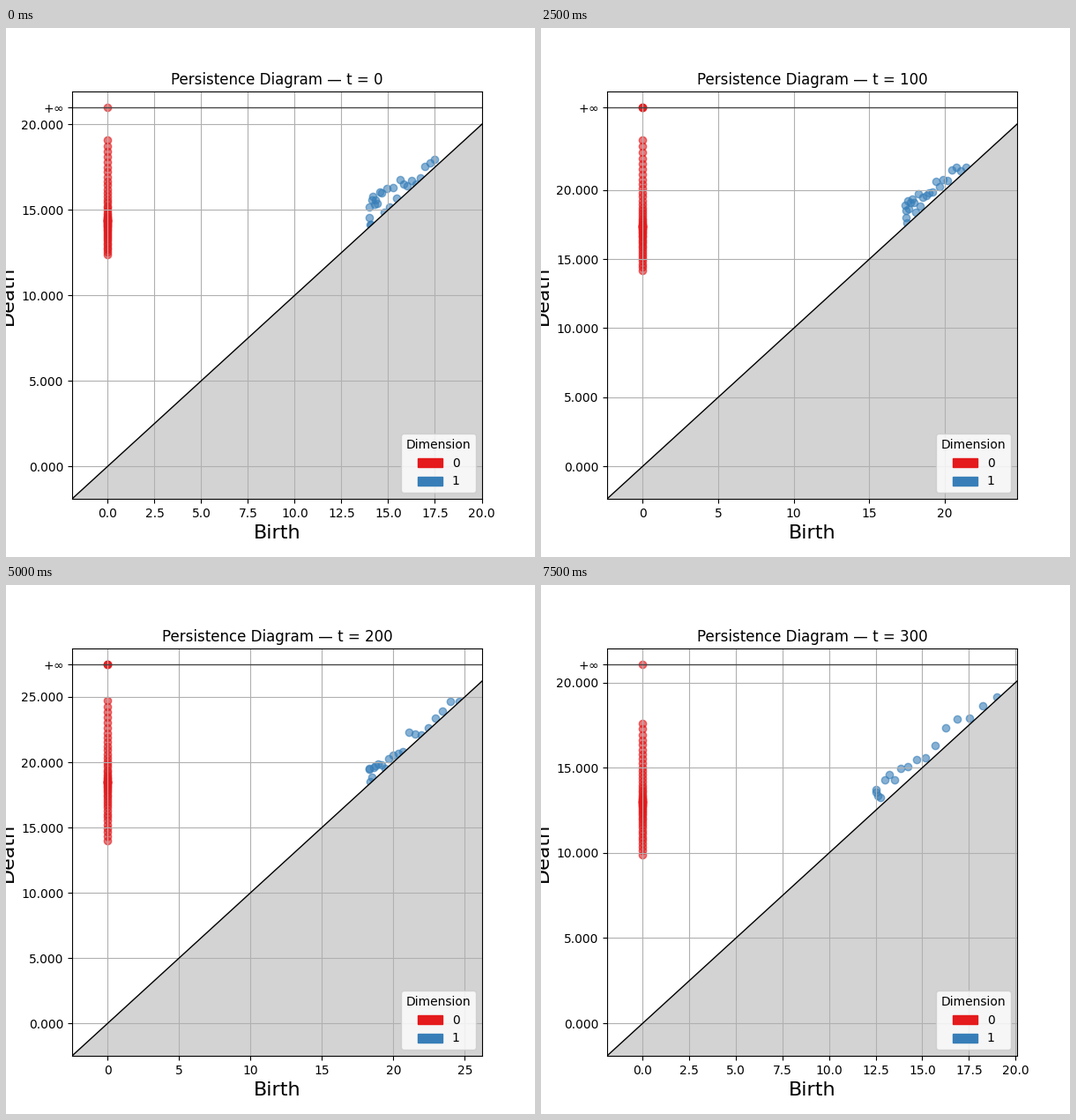
These frames come from a looping animation (600x600 px, 8000 ms). A matplotlib script:

```python
import numpy as np
import matplotlib.pyplot as plt
from matplotlib.animation import FuncAnimation
from matplotlib.patches import Patch, Polygon

RED, BLUE = plt.cm.Set1.colors[:2]
STEP, N_RED = 20, 50

# Largest death value at each step; it sets the axes
PEAKS = [19.07, 25.7, 25.7, 24.62, 24.4, 23.61, 23.7, 24.1,
         23.55, 24.95, 24.97, 24.4, 23.11, 22.2, 20.6, 19.13]

# Shape of the point clouds at key times, blended in between
TIMES = [0, 60, 100, 160, 200, 240, 300]
SHAPE = dict(
    low=[12.4, 14.5, 14.2, 12.5, 14.0, 11.0, 9.9],          # red deaths
    mid=[14.4, 18.1, 17.4, 17.9, 18.5, 14.0, 13.0],
    top=[1, 1, 1, 1, 0.99, 0.887, 0.92],                    # share of peak
    first=[14.0, 17.9, 17.4, 17.7, 18.3, 13.5, 12.5],       # blue births
    last=[17.5, 22.6, 21.4, 22.1, 24.6, 22.9, 19.0],
    count=[25, 19, 24, 13, 21, 29, 17],
)


def clouds(t, peak):
    """Red deaths and blue (birth, death) arrays at time t."""
    s = {name: np.interp(t, TIMES, vals) for name, vals in SHAPE.items()}

    # Reds crowd around the middle and thin out to both ends
    u = np.linspace(-1, 1, N_RED)
    reach = np.where(u < 0, s["low"] - s["mid"], s["top"] * peak - s["mid"])
    reds = s["mid"] + reach * np.abs(u) ** 1.8

    # Blues crowd at early births and lie just above the diagonal
    rng = np.random.default_rng(t)
    r = np.linspace(0, 1, round(s["count"])) ** 1.9
    births = s["first"] + (s["last"] - s["first"]) * r
    lives = rng.uniform(0.05, 1.8, len(r)) * (1 - 0.6 * r)
    return reds, births, np.minimum(births + lives, peak)


fig, ax = plt.subplots(figsize=(6, 6), dpi=100)


def draw(i):
    t, peak = i * STEP, PEAKS[i]
    start, end, inf = -0.1 * peak, 1.05 * peak, 1.1 * peak
    reds, births, deaths = clouds(t, peak)
    n_inf = 3 if 20 < t < 240 else 1
    reds = np.append(reds, [inf] * n_inf)

    ax.clear()
    ax.scatter(np.zeros(len(reds)), reds, alpha=0.6, color=RED)
    ax.scatter(births, deaths, alpha=0.6, color=BLUE)
    ax.add_patch(Polygon([(start, start), (end, start), (end, end)],
                         color="lightgrey"))
    ax.plot([start, end], [inf, inf], lw=1, color="k", alpha=0.6)
    ax.plot([start, end], [start, end], lw=1, color="k")

    ticks = np.arange(0, end, 5)
    ax.set_yticks([*ticks, inf], [f"{v:.3f}" for v in ticks] + [r"$+\infty$"])
    ax.grid(True)
    ax.axis([start, end, start, 1.15 * peak])
    ax.legend(handles=[Patch(color=RED, label="0"), Patch(color=BLUE, label="1")],
              title="Dimension", loc="lower right")
    ax.set_xlabel("Birth", fontsize=16)
    ax.set_ylabel("Death", fontsize=16)
    ax.set_title(f"Persistence Diagram — t = {t}")
    return []


anim = FuncAnimation(fig, draw, frames=len(PEAKS), init_func=lambda: draw(0),
                     interval=500, repeat=True, repeat_delay=0)
plt.show()
```
